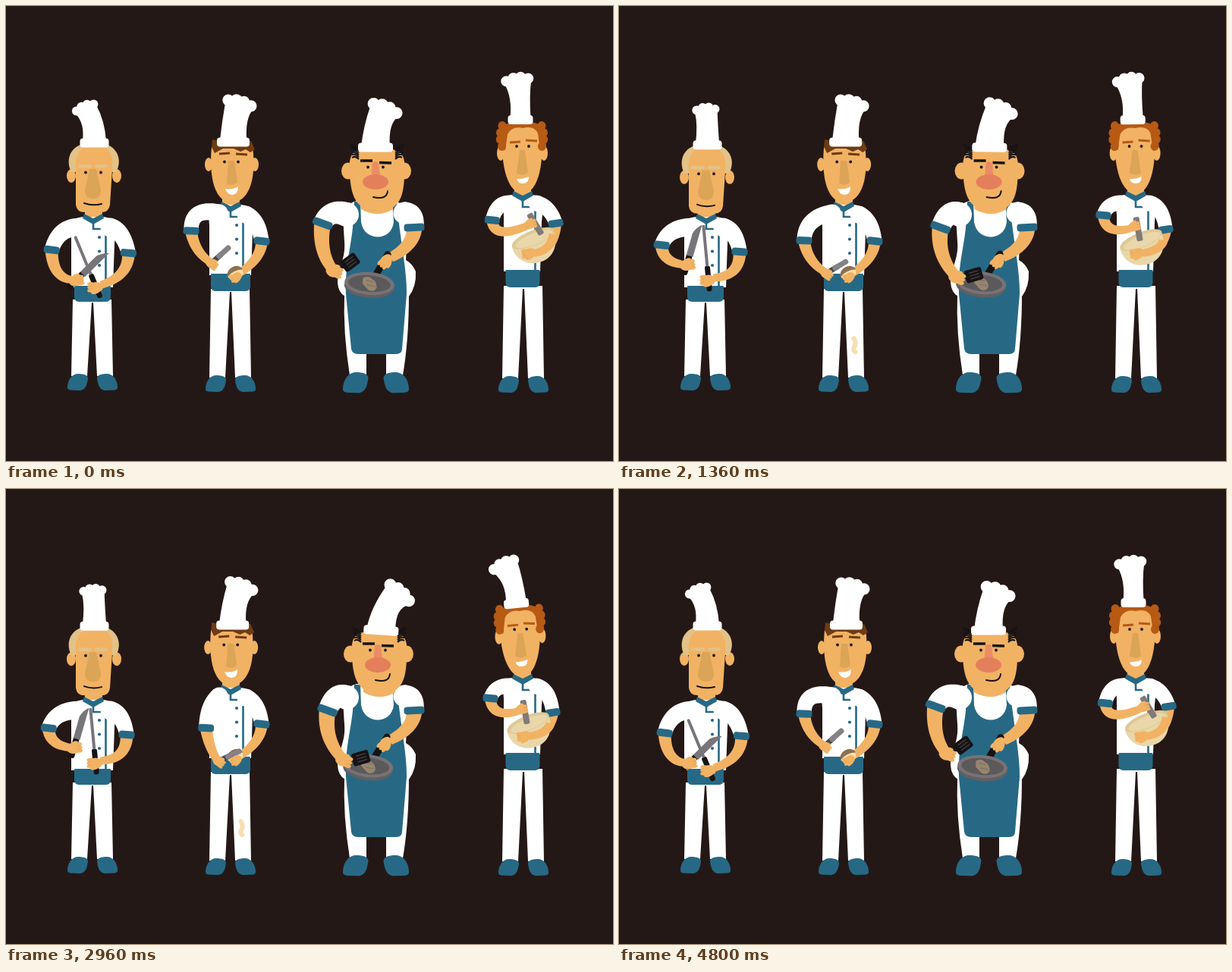
An HTML page with a canvas for the animation above (4840 ms loop, 800 px wide and 600 px high).

```html
<!DOCTYPE html>
<html lang="en">
<head>
<meta charset="utf-8">
<title>Four chefs</title>
<style>
html, body { margin: 0; width: 100%; height: 100%; overflow: hidden; background: #241817; }
canvas { display: block; }
</style>
</head>
<body>
<canvas id="stage" width="800" height="600"></canvas>
<script>
const g = document.getElementById('stage').getContext('2d');
const LOOP = 4840, STEP = 40, TAU = Math.PI * 2;
const BG = '#241817', SKIN = '#f2b263', SHADE = '#dca457', TEAL = '#276985', WHITE = '#fff';
const BLOND = '#e2c287', BROWN = '#6e3b13', GINGER = '#b65a14', BLACK = '#161314';
const STEEL = '#77757a', BEIGE = '#e9d7a9', PEEL = '#f6dfaf';

// Drawing helpers
function fill(d, color) {
  g.fillStyle = color;
  g.fill(new Path2D(d));
}
function line(d, color, width, cap = 'butt') {
  g.strokeStyle = color;
  g.lineWidth = width;
  g.lineCap = cap;
  g.stroke(new Path2D(d));
}
function oval(x, y, rx, ry, color, rot = 0) {
  g.fillStyle = color;
  g.beginPath();
  g.ellipse(x, y, rx, ry, rot, 0, TAU);
  g.fill();
}
function bar(x, y, w, h, r, color) {
  g.fillStyle = color;
  g.beginPath();
  g.roundRect(x, y, w, h, r);
  g.fill();
}
function at(x, y, rot, draw) {
  g.save();
  g.translate(x, y);
  g.rotate(rot);
  draw();
  g.restore();
}
function taper(a, c, b, w0, w1, color) {
  const left = [], right = [];
  for (let i = 0; i <= 16; i++) {
    const s = i / 16, q = 1 - s;
    const x = q * q * a[0] + 2 * q * s * c[0] + s * s * b[0];
    const y = q * q * a[1] + 2 * q * s * c[1] + s * s * b[1];
    const dx = q * (c[0] - a[0]) + s * (b[0] - c[0]);
    const dy = q * (c[1] - a[1]) + s * (b[1] - c[1]);
    const k = (w0 + (w1 - w0) * s) / 2 / Math.hypot(dx, dy);
    left.push([x - dy * k, y + dx * k]);
    right.unshift([x + dy * k, y - dx * k]);
  }
  fill('M' + left.concat(right).join('L') + 'Z', color);
}

// Motion helpers: wave peaks at +1 at the given time, swing runs 0 to 1
const wave = (t, period, peak = 0) => Math.cos(TAU * (t - peak) / period);
const swing = (t, period, peak) => (1 + wave(t, period, peak)) / 2;
const pulse = (t, period, peak) => Math.max(0, wave(t, period, peak)) ** 2;
const clamp = v => Math.max(-1, Math.min(1, v));
const mix = (a, b, s) => a.map((v, i) => v + (b[i] - v) * s);

// Shared body parts
function shoe(x, y, k, flip) {
  g.save();
  g.translate(x, y);
  g.scale(flip ? -k : k, k);
  fill('M0 18C0 8 6 0 14 0C22 0 27 2 27 6C26 14 24 21 17 22L4 21.5C1 21 0 20 0 18Z', TEAL);
  g.restore();
}
function legs(x, y, bottom) {
  fill(`M${x - 26} ${y}H${x + 25}L${x + 27} ${bottom}H${x + 6}L${x + 1} ${y + 4}H${x - 1}L${x - 7} ${bottom}H${x - 28}Z`, WHITE);
  shoe(x - 33, bottom - 3, 1, false);
  shoe(x + 33, bottom - 3, 1, true);
}
function jacket(x, y, left, right, waist, buttons) {
  fill(`M${x - 12} ${y + 5}C${left - 1} ${y + 6} ${left - 1} ${y + 16} ${left} ${y + 32}V${waist + 2}H${right - 2}L${right} ${y + 40}C${right + 4} ${y + 14} ${right} ${y + 6} ${x + 12} ${y + 5}Z`, WHITE);
  line(`M${x} ${y + 10}V${y + 21}H${x + 16.5}V${waist}`, TEAL, 2.6);
  for (let i = 0; i < buttons; i++) oval(x + 8, y + 32 + i * 18.5, 2.1, 2.1, TEAL);
}
function waistband(x, y, w, h) {
  bar(x - w / 2, y, w, h, [1, 1, 6, 6], TEAL);
}
function collar(x, y) {
  fill(`M${x - 12} ${y}L${x} ${y + 6}L${x + 12} ${y}L${x + 14} ${y + 6}L${x} ${y + 14}L${x - 14} ${y + 6}Z`, TEAL);
}
function arm(shoulder, elbow, cuff, rot, bend, hand, [w0, w1, w2, w3]) {
  taper(cuff, bend, hand, w2, w3, SKIN);
  oval(shoulder[0], shoulder[1], w0 / 2, w0 / 2, WHITE);
  taper(shoulder, elbow, cuff, w0, w1, WHITE);
  at(...cuff, rot, () => bar(-w1 / 2 - 1, -5, w1 + 2, 10, 4, TEAL));
}
function hand(x, y, rot, k = 1) {
  at(x, y, rot, () => {
    oval(0, 0, 9 * k, 7 * k, SKIN);
    for (let i = -1; i < 2; i++) oval(7 * k, i * 4.3 * k, 4.6 * k, 2.5 * k, SKIN);
    oval(1, -6 * k, 6 * k, 2.7 * k, SKIN, -.3);
    line(`M${6 * k} ${-2 * k}h${4 * k}M${6 * k} ${2 * k}h${4 * k}`, SHADE, .8);
  });
}
function hat(x, y, w, h, top, lean, rot = 0) {
  at(x, y, rot, () => {
    const a = lean * .032, ux = Math.cos(a), uy = Math.sin(a), ty = 12 - h, r = top * .165;
    const p = (k, up) => [lean + ux * k * top / 2 + uy * up, ty + uy * k * top / 2 - ux * up];
    const b = w * .41;
    fill(`M${-b} -7Q${-b + 3} ${-h * .5} ${p(-.8, -2)}L${p(-.6, 5)}L${p(.6, 5)}L${p(.84, -2)}Q${b - 2} ${-h * .55} ${b} -7Z`, WHITE);
    for (let i = 0; i < 4; i++) {
      const k = i / 2 - .75;
      oval(...p(k * .9, 5 - k * k * 6), r, r, WHITE);
    }
    bar(-w / 2, -11, w, 12, 4, WHITE);
  });
}
function ears(x1, x2, y, rx, ry) {
  oval(x1, y, rx, ry, SKIN);
  oval(x2, y, rx, ry, SKIN);
}
function eyes(x1, x2, y) {
  oval(x1, y, 1.9, 2, BLACK);
  oval(x2, y, 1.9, 2, BLACK);
}

function sharpener(t) {
  legs(114, 387, 488);
  bar(104, 258, 23, 24, 0, SKIN);
  jacket(115, 273, 86, 143, 369, 3);
  waistband(114, 369, 48, 21);
  const [lx, ly, hx, hy, knife, rx, ry, jx, jy, rod] = mix(
    [61, 323, 92, 367, -.66, 162, 326, 119, 373, -2.03],
    [56, 315, 89, 341, -1.32, 159, 324, 118, 361, -1.65],
    swing(t, 800, 510));
  const size = [25, 19, 17, 10];
  arm([137, 292], [154, 295], [rx, ry], .08, [rx, 357], [jx + 6, jy - 3], size);
  arm([97, 292], [lx + 9, 291], [lx, ly], .12, [lx + 1, hy - 4], [hx - 4, hy - 1], size);
  at(jx, jy, rod, () => {
    bar(-15, -3.5, 34, 7, 3, BLACK);
    bar(18, -2, 55, 4, 2, STEEL);
  });
  at(hx, hy, knife, () => {
    bar(-13, -4, 28, 8, 3, BLACK);
    fill('M13 -4H43Q52 -1 57 5H13Z', STEEL);
  });
  hand(jx, jy, Math.PI);
  hand(hx, hy, -.15);
  collar(115, 274);
  const bob = 1 - wave(t, 960);
  at(0, bob, 0, () => {
    ears(86, 146, 224, 6, 9);
    fill('M86 219C79 205 83 189 98 183H134C148 189 153 205 145 219Z', BLOND);
    fill('M92 216C90 196 98 183 116 183C136 183 142 196 140 216L137 262Q136 272 125 272H104Q93 272 92 262Z', SKIN);
    bar(95, 209, 18, 4.5, 2, BLOND);
    bar(117, 209, 17, 4.5, 2, BLOND);
    fill('M110 215H119L125 243Q125 254 115 254Q104 254 104 243Z', SHADE);
    eyes(105, 125, 219.5);
    line('M103 260Q114 264 126 261', BLACK, 2, 'round');
  });
  const lean = -8 + 6 * clamp(4 * wave(t, 1200, 330));
  hat(116.5, 185.5 + bob * 1.5, 38, 62, 36, lean);
}

function peeler(t) {
  legs(296, 373, 490);
  const age = (t % 1600 - 480) % 720;
  if (age >= 0 && age < 280) {
    at(304 + age * .04, 372 + age * .47, 0, () => line('M-1 -9Q3 -3 0 2T1 9', PEEL, 6, 'round'));
  }
  bar(285, 245, 23, 22, 0, SKIN);
  jacket(296, 257, 268, 325, 353, 3);
  waistband(296, 353, 52, 23);
  collar(296, 258);
  const stroke = swing(t, 240, 108), push = pulse(t, 240, 85);
  const [cy, hx, hy, aim] = mix([296, 270, 339, -.74], [318, 274, 362, -.4], stroke);
  const cx = 244 + push * 20;
  const size = [23, 19, 16, 10];
  arm([316, 275], [333, 282], [337, 310], .12, [336, 334], [308, 352], size);
  arm([281, 273], [cx - 1 + stroke * 3, 264 + (cy - 296) * 1.1], [cx, cy], .05, [cx + 4, cy + 27], [hx - 1 + push * 6, hy - 2], size);
  at(302, 352, -.5, () => {
    oval(0, 0, 11, 8.5, '#8d7152');
    fill('M-11 0Q0 -5 11 1Q9 9 0 9Q-9 9 -11 0Z', PEEL);
  });
  at(hx + push * 6, hy, aim, () => {
    bar(-4, -3.5, 24, 7, 2, '#4b484a');
    bar(11, -3.5, 23, 7, 3, '#858185');
  });
  hand(hx + push * 6, hy, .65, .85);
  hand(304, 357, 2.7, .8);
  const sway = -2 + 2 * wave(t, 1600);
  at(sway, 0, 0, () => {
    ears(267, 328, 209, 5, 9);
    fill('M271 186H325C329 215 326 258 297 259C271 258 268 215 271 186Z', SKIN);
    fill('M272 176L281 178H323L328 189L322 193L316 189L309 192L300 188H286L275 194L271 186Z', BROWN);
    line('M281 195L295 194M303 195L318 196', BROWN, 2.8);
    fill('M293 204H301L305 232Q298 239 291 234Z', SHADE);
    eyes(288, 306, 205.5);
    fill('M289 241Q298 243 306 238Q306 249 298 249Q291 248 289 241Z', WHITE);
  });
  hat(299.5 + sway, 184.5, 43, 67, 46, 11 - 3.5 * wave(t, 480, -40));
}

function fryer(t) {
  fill('M446 380H475V487H453Q444 430 446 380ZM501 380H531Q531 440 523 487H501Z', WHITE);
  shoe(444, 483, 1.24, false);
  shoe(531, 483, 1.24, true);
  fill('M462 257C440 262 445 285 446 310C448 335 437 345 437 365Q438 378 447 383H531Q541 370 540 350Q536 340 527 335L530 280Q530 262 512 257Z', WHITE);
  fill('M459 258L457 292C454 322 447 340 448 380L455 452Q456 459 464 459H514Q522 459 522 452L528 380C529 350 518 300 515 258Z', TEAL);
  fill('M467 256L468 285C472 311 508 311 511 285L509 256Z', WHITE);
  const side = wave(t, 1600, 610);
  const px = 484 + 7 * side, py = 371 + 4 * side, hx = 504 + 4 * side, hy = 337 + 2 * side;
  arm([525, 273], [539, 272], [538, 292], -.04, [538, 316], [hx + 6, hy - 4], [29, 25, 21, 13]);
  line(`M${hx + 2} ${hy - 8}L${px + 9} ${py - 14}`, BLACK, 9, 'round');
  at(px, py, .01 - .1 * side, () => {
    oval(0, 2, 33, 15, '#625f61');
    oval(0, -2, 33, 15, '#777276');
    oval(0, -2, 28, 11, '#5c595b');
    fill('M-9 -9Q-2 -13 3 -8Q9 -6 10 2Q8 9 0 7Q-5 3 -9 -1Z', '#96866f');
    line('M-5 -6L5 -5M-3 0L8 1', '#7d705f', 1.2);
  });
  hand(hx, hy, 2.3);
  const [cx, cy, sx, sy, bx, by, turn] = mix(
    [415, 285, 427, 347, 449, 332, -.75],
    [430, 297, 456, 366, 482, 371, .05],
    pulse(t, 800, 650));
  arm([449, 275], [cx + 10, 267], [cx, cy], .35, [cx - 5, cy + 36], [sx - 2, sy - 4], [32, 25, 22, 14]);
  line(`M${sx} ${sy}L${bx} ${by}`, BLACK, 6, 'round');
  at(bx, by, turn, () => {
    bar(-12, -8.5, 23, 17, 3, BLACK);
    line('M-6 -4H7M-6 0H7M-6 4H7', '#4a4446', 1.2);
  });
  hand(sx, sy, .3, 1.1);
  const lean = swing(t, 1200, 590);
  at(lean * 3, 0, 0, () => {
    fill('M468 255H510V268Q490 280 468 268Z', SKIN);
    ears(451, 525, 217.5, 9, 11);
    fill('M453 205Q455 190 468 189H508Q523 190 525 205C526 245 523 270 490 271C458 270 452 245 453 205Z', SKIN);
    for (let i = 0; i < 6; i++) {
      const y = 202 - i * 2.6, x = 9 + i * .6;
      line(`M465 ${y}q${-x * .5} -5 ${-x} -${2 + i}M513 ${y}q${x * .5} -5 ${x} -${2 + i}`, BLACK, 2);
    }
    fill('M483 207Q487 203 491 207L494 232H481Z', '#e98c65');
    oval(487, 232, 17, 10, '#e47f5c');
    line('M467 204H483M492 206.5L508 207', BLACK, 3.6);
    eyes(477, 497, 212.5);
    line('M484 252Q502 256 503 244', BLACK, 2, 'round');
  });
  hat(487 + lean * 7, 191.5, 46, 67, 48, 12 + lean * 8, lean * .07);
}

function mixer(t) {
  legs(682, 369, 491);
  jacket(681, 244, 656, 706, 348, 0);
  waistband(681, 348, 45, 23);
  const [cx, cy, hx, hy, sx, sy, turn, bx, by, rx, ry] = mix(
    [641, 283, 691, 288, 699, 287, -.58, 695, 306, 725, 286],
    [638, 275, 676, 292, 682, 295, -.12, 687, 309, 720, 296],
    swing(t, 800, 470));
  const size = [21, 18, 15, 10];
  arm([699, 260], [717, 264], [rx, ry], -.15, [rx - 2, 316], [bx + 13, 324], size);
  at(bx, by, -.38, () => {
    fill('M-30 0C-32 22 -16 33 0 33C18 33 29 18 29 0Z', BEIGE);
    oval(0, 0, 29.5, 10, '#ddc996');
    oval(1, 1.5, 26, 7.5, BEIGE);
  });
  arm([665, 260], [cx + 6, 258], [cx, cy], .1, [cx + 2, cy + 26], [hx - 4, hy + 2], size);
  at(sx, sy, turn, () => bar(-4, -16, 8, 32, 2, '#817a79'));
  hand(hx, hy, -.25, .85);
  taper([rx - 3, ry + 14], [rx - 6, 322], [bx + 2, 326], 12, 10, SKIN);
  hand(bx - 4, 326, 3, .95);
  const sway = swing(t, 1200, 610);
  bar(670, 232, 22, 18, 0, SKIN);
  collar(681, 244);
  at(681 - sway, 248, -sway * .03, () => {
    g.translate(-681, -248);
    ears(652, 709, 194, 5, 10);
    fill('M655 165C660 153 700 152 706 165C709 200 704 246 681 248C658 246 651 200 655 165Z', SKIN);
    fill('M651 163C656 149 704 148 710 163L712 185L704 190L701 168Q696 157 681 161Q667 158 661 169L658 190L650 188Z', GINGER);
    for (let i = 0; i < 4; i++) {
      const out = Math.sin(i) * 3, y = 158 + i * 9;
      oval(654 - out, y, 5.5, 6, GINGER);
      oval(706 + out, y, 5.5, 6, GINGER);
    }
    line('M664 180L678 179M685 177L700 178', GINGER, 3);
    fill('M677 190H684L688 220Q680 225 673 220Z', SHADE);
    eyes(673, 689, 185);
    fill('M673 228Q681 229 689 225Q689 234 681 234Q675 234 673 228Z', WHITE);
  });
  hat(678 - sway * 5, 155 + sway, 33, 68, 43, -4 - sway * 7, -sway * .1);
}

function draw(now) {
  const t = Math.floor(now % LOOP / STEP) * STEP;
  g.fillStyle = BG;
  g.fillRect(0, 0, 800, 600);
  sharpener(t);
  peeler(t);
  fryer(t);
  mixer(t);
}
function tick(now) {
  draw(now);
  requestAnimationFrame(tick);
}
draw(0);
requestAnimationFrame(tick);
</script>
</body>
</html>
```
